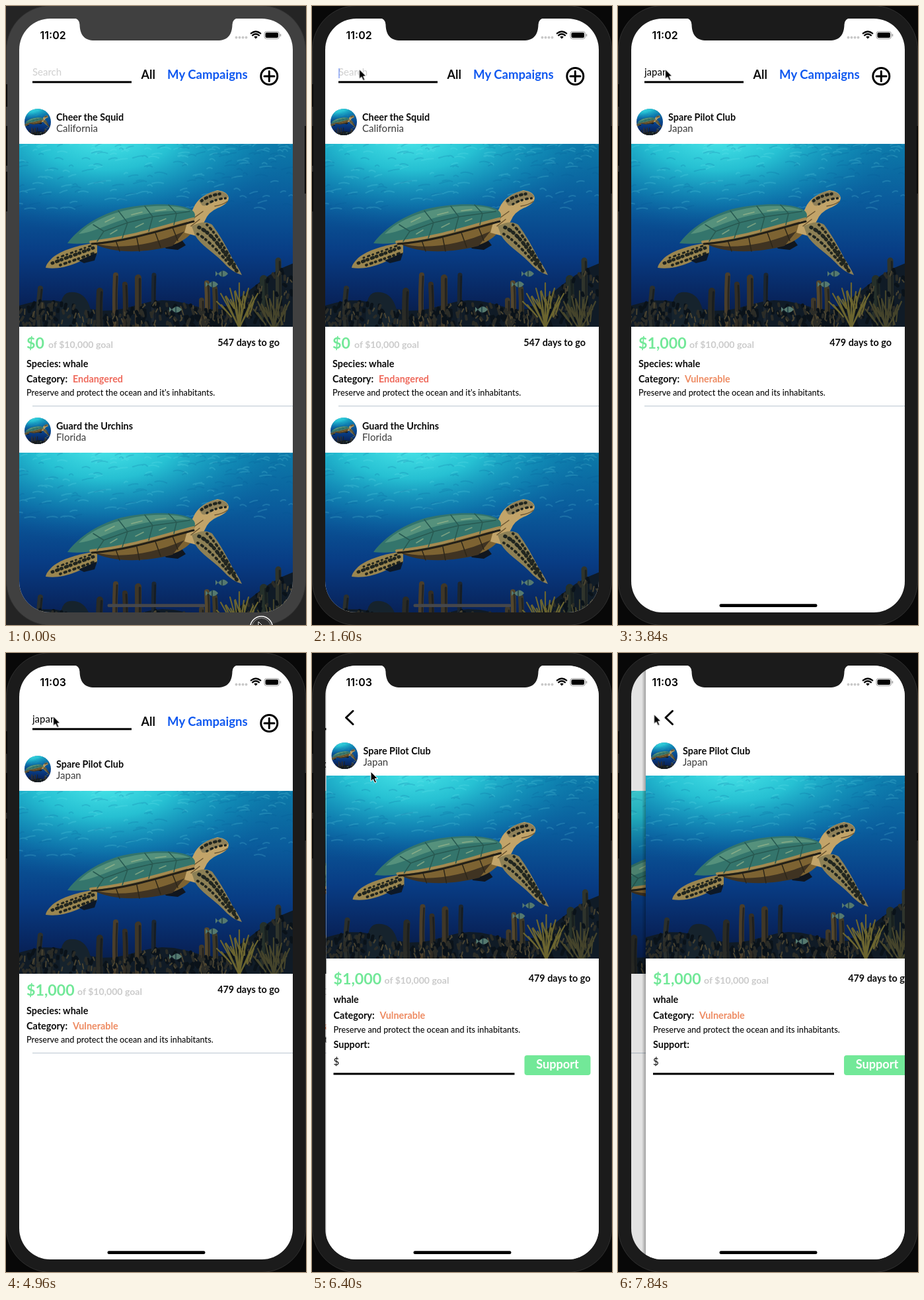
Recreate the animation shown at these times as an HTML page. Size 454 by 934 pixels, loop 8 s.

```html
<!DOCTYPE html>
<html lang="en">
<head>
<meta charset="utf-8">
<title>Campaign search</title>
<style>
  html, body { margin: 0; width: 100%; height: 100%; overflow: hidden; background: #111; }
  svg { display: block; width: 454px; height: 934px; }
  text { font-family: Lato, "Open Sans", sans-serif; white-space: pre; }
  .clock { font: 600 16px Inter, Roboto, sans-serif; }
</style>
</head>
<body>
<svg id="stage" viewBox="0 0 454 934" xmlns="http://www.w3.org/2000/svg"></svg>
<script>
const LOOP = 8000;
const GREEN = '#72e898', BLUE = '#0f58f0', RED = '#ef6a5c', ORANGE = '#ee8b62';

const text = (x, y, str, size = 14.4, o = {}) =>
  `<text x="${x}" y="${y}" font-size="${size}" font-weight="${o.weight || 700}"
    fill="${o.fill || '#0b0b0b'}" text-anchor="${o.anchor || 'start'}">${str}</text>`;
const rect = (x, y, w, h, fill, r = 0) =>
  `<rect x="${x}" y="${y}" width="${w}" height="${h}" rx="${r}" fill="${fill}"/>`;
const path = (d, fill, extra = '') => `<path d="${d}" fill="${fill}" ${extra}/>`;
const line = (d, stroke, width, extra = '') =>
  path(d, 'none', `stroke="${stroke}" stroke-width="${width}" stroke-linecap="round" stroke-linejoin="round" ${extra}`);
const spots = (d, width) => line(d, '#20251f', width, 'stroke-dasharray="1 6 2.500 5"');
const stops = list => list.map(([at, color, alpha = 1]) =>
  `<stop offset="${at}" stop-color="${color}" stop-opacity="${alpha}"/>`).join('');

let seed = 7;
const random = (low, high) => {
  seed = (seed * 16807) % 2147483647;
  return low + (high - low) * seed / 2147483647;
};

// Underwater picture, 414 x 276
function ripples(count, color, alpha) {
  let d = '';
  for (let i = 0; i < count; i++) {
    const y = 100 * random(0, 1) ** 1.5, w = random(5, 18);
    d += `M${random(-5, 410)} ${y}q${w / 2} -3 ${w} ${random(-4, 2)}`;
  }
  return line(d, color, 2, `opacity="${alpha}"`);
}
const ridge = x => 244 - 8 * Math.sin(x / 28) - Math.max(0, x - 300) * .5;
function mottle(count, color, width) {
  let d = '';
  for (let i = 0; i < count; i++) {
    const x = random(0, 414);
    d += `M${x} ${random(ridge(x), 276)}l${random(-3, 3)} ${random(2, 8)}`;
  }
  return line(d, color, width);
}
function coral(x, top, width, color) {
  const mid = (top + 280) / 2, lean = random(-4, 4);
  return line(`M${x} 280Q${x + lean} ${mid} ${x} ${top}`, color, width) +
    line(`M${x + width / 4} 280Q${x + lean + width / 4} ${mid} ${x + width / 4} ${top + 2}`, '#11161a', width / 3, 'opacity=".6"');
}
function bush(x, y, spread, color) {
  let d = '';
  for (let i = -4; i <= 4; i++) {
    const tip = x + i * spread / 4, top = y + Math.abs(i) * 4 + (i & 1) * 9;
    d += `M${x} 278Q${x + i * 2} ${top + 35} ${tip} ${top}`;
    d += `M${x + i * 4} ${top + 30}L${tip - 6} ${top + 12}`;
  }
  return line(d, color, 2.2);
}
const fish = (x, y) => path(`M${x - 8} ${y}q8 -9 15 0q-8 9 -15 0l-4 -4v8z`, '#55796f') +
  line(`M${x - 2} ${y - 4}v8`, '#1c3c44', 1.5);

const turtle =
  path('M212 143L243 141L252 153L240 160L222 158Z', '#10161f') +
  path('M118 149C92 152 64 160 50 172Q40 182 40 187Q62 190 86 180L118 166Z', '#9a8650') +
  spots('M50 180L112 157', 5) + spots('M62 183L116 164', 4) + spots('M58 172L108 154', 3) +
  path('M90 176L118 164L114 176L98 180Z', '#0d1826') +
  path('M108 148C140 165 190 164 216 156C246 152 262 138 272 118L260 106Z', '#7d6332') +
  path('M112 150C150 160 200 154 250 132L232 154C190 165 140 166 112 150Z', '#3f3322') +
  line('M146 146L152 162M178 142L182 162M206 134L214 156M232 126L240 146', '#2c2619', 1.5) +
  path('M256 112L266 92Q276 76 300 70Q316 72 317 82Q316 91 300 97Q286 103 281 116L268 139L250 134Z', '#c2a469') +
  path('M272 86Q284 72 302 71Q316 74 316 81Q304 80 293 88Q283 95 277 93Z', '#8f8058') +
  spots('M276 86Q288 77 308 75', 4.5) + spots('M284 91Q297 83 314 82', 3.5) +
  line('M296 94Q308 92 315 87M264 112L278 102M260 124L273 114', '#6b5531', 1.5) +
  path('M261 124Q280 114 292 122C304 138 314 156 322 172Q332 187 337 198Q322 194 308 178C292 162 276 154 266 138Z', '#8d8055') +
  spots('M272 126C290 134 304 154 330 193', 5.5) + spots('M284 122C300 138 312 160 326 182', 4) +
  spots('M270 136C288 146 304 166 322 186', 4) +
  path('M73 150C86 132 112 110 154 98C194 89 238 89 258 98Q270 104 264 114C220 124 170 145 112 149Q90 152 73 150Z', '#34756c') +
  path('M90 136C112 114 146 101 190 95C222 92 246 94 258 101C224 100 190 104 158 114C130 123 110 134 90 136Z', '#55917c') +
  line('M108 148C164 143 218 124 264 113', '#a58a50', 4) +
  line('M110 151C166 147 222 128 264 117', '#211f18', 3) +
  line('M112 122L128 132L118 147M128 132L164 119L156 142M164 119L202 110L196 132M202 110L238 105L234 122M150 101L164 119M190 94L202 110M226 92L238 105L258 102', '#285a52', 1.5) +
  line('M130 118l14 -7M170 107l16 -4M206 101l16 -2M138 136l10 -6M176 126l12 -6M212 117l10 -4', '#a9be90', 1.6, 'opacity=".6"');

const ground = Array.from({ length: 24 }, (_, i) => `L${i * 18} ${ridge(i * 18)}`).join('');
const reef =
  path(`M0 276${ground}V276Z`, '#101b26') +
  path('M62 276Q58 226 76 224Q98 222 106 244L116 276Z', '#16232d') +
  coral(32, 218, 8, '#2b302e') + coral(46, 244, 8, '#232a2c') + coral(122, 222, 10, '#2a2b26') +
  coral(146, 198, 8, '#4a3e2b') + coral(160, 212, 8, '#332e25') + coral(180, 202, 10, '#3f3728') +
  coral(204, 198, 7, '#1c2630') + coral(284, 210, 8, '#54472d') + coral(296, 218, 8, '#3f3a29') +
  coral(276, 236, 8, '#40392a') + coral(370, 204, 12, '#25302a') + coral(392, 176, 9, '#2f342c') +
  mottle(150, '#0a1219', 5) + mottle(90, '#2b2c27', 4) + mottle(80, '#4a4431', 2) +
  bush(333, 210, 28, '#6a642f') + bush(385, 222, 24, '#45442b') +
  fish(239, 250) + fish(294, 212) + fish(309, 196);

const photo = `<svg id="photo" width="414" height="276" overflow="hidden">
  <rect width="414" height="276" fill="url(#deep)"/><rect width="414" height="276" fill="url(#glow)"/>
  ${ripples(110, '#7cecee', .16)}${ripples(90, '#06538f', .16)}${reef}${turtle}</svg>`;

// App screens
const avatar = y => `<g transform="translate(48 ${y})"><g clip-path="url(#disc)">
  <use href="#photo" transform="translate(-30 -20) scale(.145)"/></g></g>`;
const heading = (y, name, place) => avatar(y) + text(76, y - 2, name) +
  text(76, y + 15, place, 15, { weight: 400, fill: '#3c3c3c' });
const raised = (y, amount, goalX) => text(31, y, amount, 23.2, { fill: GREEN }) +
  text(goalX, y - 1, 'of $10,000 goal', 14.1, { fill: '#cbcbcb' });
const category = (y, [name, color]) => text(31, y, 'Category:') + text(101, y, name, 14.4, { fill: color });
const about = (y, str) => text(31, y, str, 12.7, { weight: 500 });

function row(c, dy = 0) {
  return `<g transform="translate(0 ${dy})">
    <g class="caption">${heading(175, c.name, c.place)}
      ${raised(517, c.amount, c.goalX)}${text(414, 513, c.days, 14.4, { anchor: 'end' })}
      ${text(31, 545, 'Species: whale')}${category(568, c.status)}${about(588, c.about)}</g>
    <use href="#photo" x="20" y="208"/>
    ${rect(40, 603, 394, 1.2, '#c3ced6')}</g>`;
}
const ocean = word => `Preserve and protect the ocean and ${word} inhabitants.`;
const fresh = { amount: '$0', goalX: 64, days: '547 days to go', status: ['Endangered', RED], about: ocean("it's") };
const squid = { ...fresh, name: 'Cheer the Squid', place: 'California' };
const urchins = { ...fresh, name: 'Guard the Urchins', place: 'Florida' };
const found = { name: 'Spare Pilot Club', place: 'Japan', amount: '$1,000', goalX: 108,
  days: '479 days to go', status: ['Vulnerable', ORANGE], about: ocean('its') };

const header = `
  <g id="hint">${text(40, 105, 'Search', 15, { weight: 400, fill: '#cfcfcf' })}</g>
  <text id="query" x="40" y="105" font-size="15">${[...'japan'].map(c => `<tspan>${c}</tspan>`).join('')}</text>
  <g id="caret">${rect(40, 94, 2, 15, '#4b74f0')}</g>
  <g class="caption">${rect(40, 113.3, 150, 3, '#000')}
    ${text(204.5, 110, 'All', 18)}${text(244, 110, 'My Campaigns', 18.6, { fill: BLUE })}</g>
  <circle cx="398.300" cy="106" r="12.500" fill="none" stroke="#000" stroke-width="3"/>
  ${line('M391 106h15M398.300 98.500v15', '#000', 3)}`;

const detail = `${rect(14, 19, 6, 896, 'url(#edge)')}
  <rect class="page" x="20" y="19" width="414" height="896"/>
  ${line('M60.500 87.500L50 97.500L60.500 107.500', '#000', 3)}
  ${heading(155, found.name, found.place)}<use href="#photo" x="20" y="185"/>
  ${raised(500, found.amount, found.goalX)}${text(420, 496, found.days, 14.4, { anchor: 'end' })}
  ${text(31, 528, 'whale')}${category(552, found.status)}${about(573, found.about)}
  ${text(31, 596, 'Support:')}${text(31, 622, '$', 15, { weight: 400 })}
  ${rect(31, 633.5, 274, 3, '#000')}${rect(320, 607, 100, 30, GREEN, 4)}
  ${text(370, 627, 'Support', 18.2, { fill: '#fff', anchor: 'middle' })}`;

const status = `
  <path id="notch" d="M102 18Q111 19 111.500 28C112 44 119 52 134 52H320C335 52 342 44 342.500 28Q343 19 352 18Z"/>
  <text id="before" class="clock" x="51.500" y="49.500">11:02</text>
  <text id="after" class="clock" x="51.500" y="49.500">11:03</text>
  ${[348.5, 353.5, 358.5, 363.5].map(x => `<circle cx="${x}" cy="47.500" r="1.900" fill="#c9c9c9"/>`).join('')}
  ${path('M378 49.500l-2.800 -2.900q2.800 -2.400 5.600 0z', '#000')}
  ${line('M373 44.300q5 -4.200 10 0M370.800 41.300q7.200 -5.600 14.400 0', '#000', 2.3)}
  <rect x="391" y="38.500" width="22.500" height="11" rx="3.300" fill="none" stroke="#999"/>
  ${rect(392.5, 40, 19.5, 8, '#000', 2)}${rect(414.7, 42, 1.5, 4, '#999', 1)}`;

const buttons = [[0, 118, 34], [0, 181, 60], [0, 250, 60], [452, 181, 102]]
  .map(([x, y, h]) => rect(x, y, 2, h, '#080808')).join('');

document.getElementById('stage').innerHTML = `
<defs>
  <linearGradient id="deep" x2="0" y2="1">${stops([[0, '#0c7ba9'], [.3, '#0a5c9c'], [.6, '#083c84'], [.85, '#08245c'], [1, '#081a3c']])}</linearGradient>
  <radialGradient id="glow" gradientUnits="userSpaceOnUse" cx="130" cy="-20" r="230" gradientTransform="matrix(1.300 0 0 .650 -39 0)">
    ${stops([[0, '#4ce8ea'], [.35, '#2acbd9', .88], [.7, '#159dc4', .4], [1, '#0b62a6', 0]])}</radialGradient>
  <linearGradient id="edge">${stops([[0, '#000', 0], [1, '#000', .3]])}</linearGradient>
  <clipPath id="disc"><circle r="20"/></clipPath>
  <clipPath id="screen"><rect x="20" y="19" width="414" height="896" rx="47"/></clipPath>
  ${photo}
</defs>
<rect id="outside" width="454" height="934"/>
<rect id="bezel" x=".500" y="-.500" width="453" height="935" rx="67" stroke="#303030"/>
${buttons}
<g clip-path="url(#screen)">
  <rect class="page" x="20" y="19" width="414" height="896"/>
  <g id="list">
    <g id="all">${row(squid)}${row(urchins, 466)}</g>
    <g id="result">${row(found)}</g>
    ${header}
  </g>
  <g id="dim">${rect(20, 19, 414, 896, '#000')}</g>
  <g id="detail">${detail}</g>
  <rect id="home" x="153.500" y="902.300" width="148" height="4.700" rx="2.300"/>
</g>
${status}
<g id="ring"><circle cx="386.500" cy="938" r="17" fill="#303030" stroke="#fff" stroke-width="1.500"/>
  <circle cx="386.500" cy="938" r="14.500" fill="none" stroke="#999"/></g>
<g id="pointer">${path('M0 0V14.500L3.500 11.500L6 17L8.500 16L6.200 10.500H10.500Z', '#000', 'stroke="#fff" stroke-width="1"')}</g>`;

// Each track is a list of [time, value]; values hold until the next step.
function play(target, property, track) {
  const frames = track.map(([at, value]) => ({ offset: at / LOOP, [property]: value, easing: 'step-end' }));
  frames.push({ offset: 1, [property]: track[track.length - 1][1] });
  const nodes = typeof target === 'string' ? document.querySelectorAll(target) : [target];
  for (const node of nodes) node.animate(frames, { duration: LOOP, iterations: Infinity }).startTime = 0;
}
const move = (target, track) =>
  play(target, 'transform', track.map(([at, x, y = 0]) => [at, `translate(${x}px, ${y}px)`]));
const show = (target, from, to = LOOP) => {
  const track = [[0, from ? 'hidden' : 'visible']];
  if (from) track.push([from, 'visible']);
  if (to < LOOP) track.push([to, 'hidden']);
  play(target, 'visibility', track);
};

const ACTIVE = 960, TYPED = [2560, 2720, 2880, 3200, 3360], FILTERED = 3680, MINUTE = 4960, BACK = 7840;

play('#bezel', 'fill', [[0, '#404040'], [ACTIVE, '#1b1b1b']]);
play('#notch', 'fill', [[0, '#404040'], [ACTIVE, '#1b1b1b']]);
play('#outside', 'fill', [[0, '#242424'], [ACTIVE, '#080808']]);
play('#home', 'fill', [[0, '#45474b'], [FILTERED, '#000']]);
play('.page', 'fill', [[0, '#fff'], [6080, '#f8f8f8'], [6240, '#fff']]);

show('#ring', 0, 160);
play('#all', 'display', [[0, 'inline'], [FILTERED, 'none']]);
play('#result', 'display', [[0, 'none'], [FILTERED, 'inline']]);
show('.caption', 0, BACK);
show('#hint', 0, TYPED[0]);
show('#before', 0, MINUTE);
show('#after', MINUTE);

const query = document.getElementById('query');
[...query.children].forEach((letter, i) => show(letter, TYPED[i]));
move('#caret', [[0, 0], ...TYPED.map((at, i) => [at, query.getSubStringLength(0, i + 1)])]);
play('#caret', 'opacity', [[0, 0], [1600, .5], [1760, 1], [2080, 0], [TYPED[0], 1], [FILTERED, 0]]);

// The list trails the detail page at three tenths of its travel.
const slide = [[0, 424], [6080, 226], [6240, 20], [6400, 1.5], [6560, .4], [6720, 0], [BACK, 22]];
move('#detail', slide);
move('#list', slide.map(([at, x]) => [at, -.3 * Math.max(0, 414 - x)]));
play('#dim', 'opacity', [[0, 0], [6240, .1], [BACK, .11]]);

move('#pointer', [[0, 382, 929], [160, 365, 880], [320, 290, 660], [480, 190, 390], [640, 110, 190],
  [800, 76, 108], [960, 71.5, 95.5], [5280, 73, 103], [5440, 78, 130], [5600, 85, 162], [5760, 89, 179],
  [7040, 86, 168], [7200, 75, 136], [7360, 62, 106], [7520, 56, 95], [7680, 54.5, 92.500]]);
</script>
</body>
</html>
```
